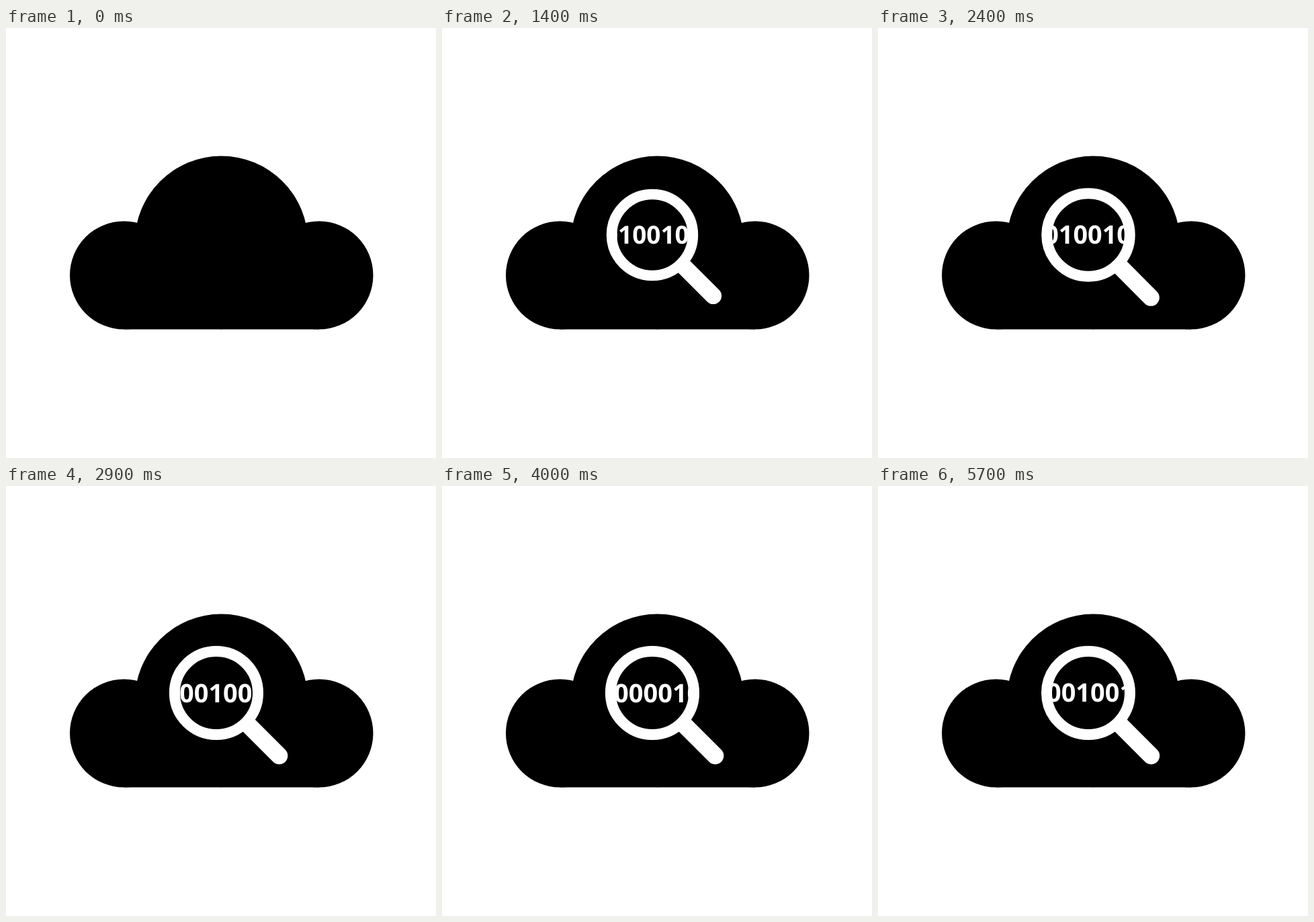
Write an HTML page that moves like this. It is 640 by 640 pixels and loops after 5800 ms.

```html
<!DOCTYPE html>
<html lang="en">
<head>
<meta charset="utf-8">
<title>Cloud data search</title>
<style>
  html, body { margin: 0; width: 100%; height: 100%; overflow: hidden; background: #fff; }
  svg { display: block; width: 100vw; height: 100vh; }
  text { font: 700 38px "Open Sans", "Noto Sans", sans-serif; fill: #fff; text-rendering: geometricPrecision; }
</style>
</head>
<body>
<svg viewBox="0 0 640 640">
  <clipPath id="lens"><circle r="55"/></clipPath>
  <g id="cloud">
    <circle cx="320.5" cy="319.4" r="128.9"/>
    <circle cx="175.5" cy="368" r="80.5"/>
    <circle cx="466" cy="368" r="80.5"/>
    <rect x="175.5" y="319.4" width="290.5" height="129.1"/>
  </g>
  <g id="glass" visibility="hidden">
    <line id="handle" x1="40" y1="40" x2="40" y2="40" stroke="#fff" stroke-width="25.5" stroke-linecap="round"/>
    <circle r="62" stroke="#fff" stroke-width="16"/>
    <g clip-path="url(#lens)"><text id="bits" y="13.5">00100100100001001</text></g>
  </g>
</svg>
<script>
  const LOOP = 5800, STEP = 100, APPEAR = 400;
  const DIGIT = 38 * 1169 / 2048;
  const glass = document.getElementById('glass');
  const handle = document.getElementById('handle');
  const bits = document.getElementById('bits');
  const clamp = x => Math.min(1, Math.max(0, x));
  const smooth = u => u * u * (3 - 2 * u);

  // Quick growth, then a damped swing around full size
  function lensScale(t) {
    const start = 0.33, end = 0.8;
    if (t < end) {
      const u = clamp((t - start) / (end - start));
      return u * (1.69 - 0.69 * u);
    }
    const s = t - end;
    return 1 + 0.115 * Math.exp(-1.25 * s) * Math.sin(2 * Math.PI * s / 1.04);
  }

  function handleEnd(t) {
    return 93.5 - 53.5 * Math.exp(-Math.max(0, t - 0.462) / 0.2);
  }

  // Number of digits that have passed the lens centre
  function scroll(t) {
    return 2.76 + 11.1 * smooth(clamp((t - 0.05) / 5.55));
  }

  function draw(ms) {
    const t = ms / 1000;
    glass.setAttribute('visibility', ms < APPEAR ? 'hidden' : 'visible');
    glass.setAttribute('transform', `translate(313 308) scale(${lensScale(t)})`);
    handle.setAttribute('x2', handleEnd(t));
    handle.setAttribute('y2', handleEnd(t));
    bits.setAttribute('x', -scroll(t) * DIGIT);
  }

  const begin = performance.now();
  function tick() {
    const ms = (performance.now() - begin) % LOOP;
    draw(Math.floor(ms / STEP) * STEP);
    requestAnimationFrame(tick);
  }
  tick();
</script>
</body>
</html>
```
